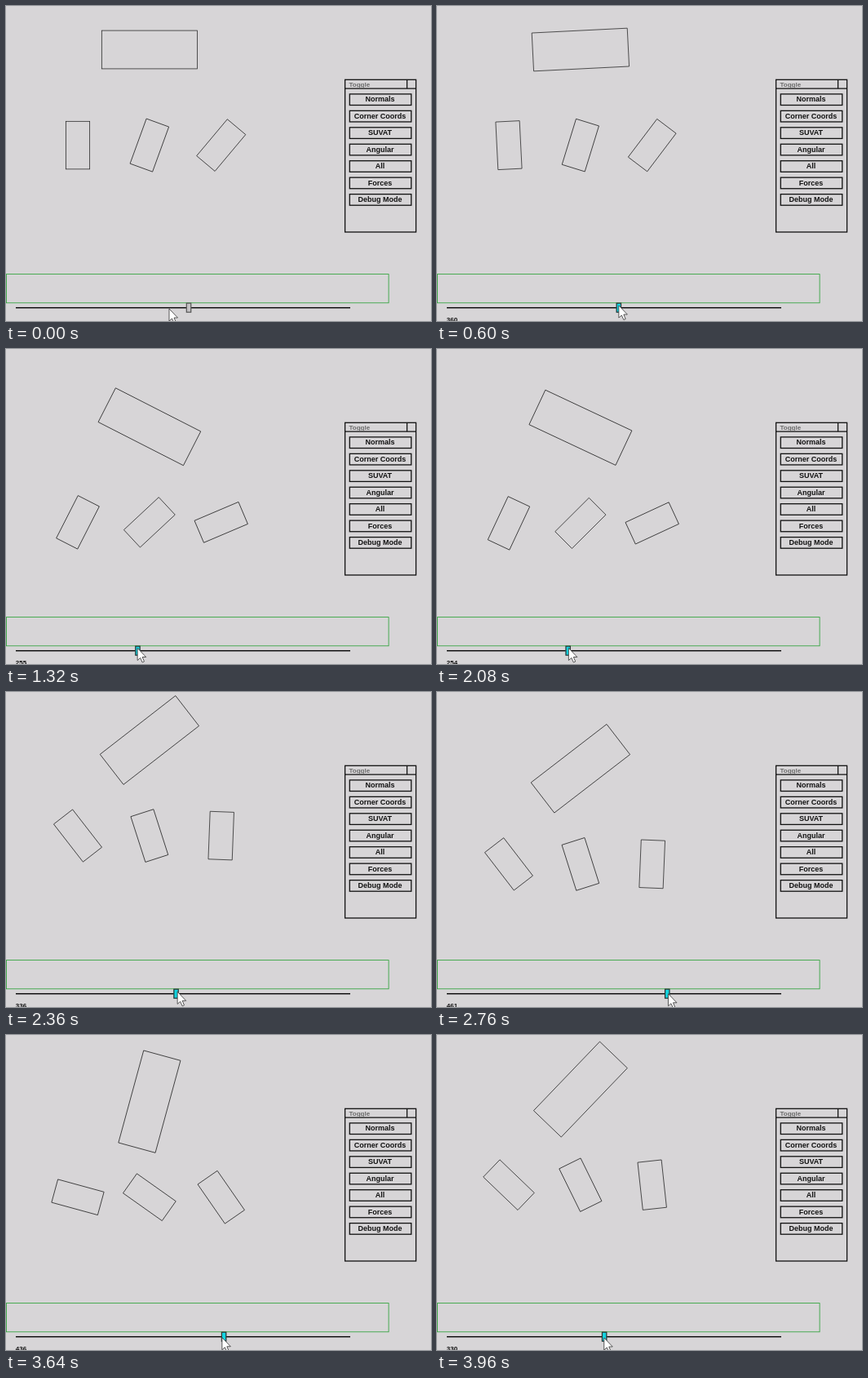
An HTML page with a canvas for the animation above (4000 ms loop, 521 by 386 pixels).

```html
<!DOCTYPE html>
<html lang="en">
<head>
<meta charset="utf-8">
<title>Physics timeline</title>
<style>
  html, body { margin: 0; width: 100%; height: 100%; overflow: hidden; background: #d7d5d7; }
  canvas { display: block; }
</style>
</head>
<body>
<canvas id="stage" width="521" height="386"></canvas>
<script>
const ctx = document.getElementById('stage').getContext('2d');
const LOOP = 4000, STEP = 40;
const SCALE = 410 / 700;       // pixels per world unit and per slider step
const START = 362;             // slider step at which the boxes are at rest
const SPIN = 0.025;            // radians per slider step
const FALL = 0.00345;          // pixels per squared slider step
const INK = '#111';

// Each drag moves the slider to an offset from START. Integration error
// leaves the boxes `drift` pixels lower; `skew` below 1 makes a brisker start.
const drags = [
  { from: 480, until: 600, to: -2, skew: 1, drift: 0, pointerY: 367 },
  { from: 675, until: 1380, to: -109, skew: 1, drift: 2.5, pointerY: 366.5 },
  { from: 2070, until: 3320, to: 178, skew: 0.71, drift: 7, pointerY: 370.5 },
  { from: 3360, until: 4000, to: -34, skew: 0.85, drift: 0, pointerY: 371 }
];

const clamp = u => Math.max(0, Math.min(1, u));
const ease = u => u * u * (3 - 2 * u);
const mix = (a, b, u) => a + (b - a) * u;
const handleX = n => 12 + (START + n) * SCALE;

function stateAt(t) {
  const approach = ease(clamp((t - 80) / 320));
  const state = { n: 0, drift: 0, pointerY: mix(371, 367, approach), approach };
  for (const drag of drags) {
    const u = clamp((t - drag.from) / (drag.until - drag.from));
    const s = ease(u ** drag.skew);
    state.n = mix(state.n, drag.to, s);
    state.drift += drag.drift * s * s;
    state.pointerY = mix(state.pointerY, drag.pointerY, ease(s));
  }
  return state;
}

function outline(x, y, w, h, color, width) {
  ctx.strokeStyle = color;
  ctx.lineWidth = width;
  ctx.strokeRect(x, y, w, h);
}

function line(x1, y1, x2, y2, width) {
  ctx.strokeStyle = INK;
  ctx.lineWidth = width;
  ctx.beginPath();
  ctx.moveTo(x1, y1);
  ctx.lineTo(x2, y2);
  ctx.stroke();
}

function label(text, x, y, size, color = INK, align = 'left') {
  ctx.font = `bold ${size}px "Liberation Sans", Arial, sans-serif`;
  ctx.fillStyle = color;
  ctx.textAlign = align;
  ctx.fillText(text, x, y);
}

function box(x, y, w, h, angle) {
  ctx.save();
  ctx.translate(x, y);
  ctx.rotate(angle);
  outline(-w / 2, -h / 2, w, h, '#222', 0.75);
  ctx.restore();
}

function drawBoxes(n, dy) {
  const turn = n * SPIN;
  box(175.9, 53.5 + dy, 200 * SCALE, 80 * SCALE, turn);
  for (let i = 0; i < 3; i++) {
    box(88 + i * 150 * SCALE, 170.6 + dy, 50 * SCALE, 100 * SCALE, turn + i * Math.PI / 9);
  }
}

function drawPanel() {
  outline(415.6, 90.3, 87, 186.7, INK, 1.3);
  line(415, 101.2, 503, 101.2, 1.3);
  line(491.6, 90, 491.6, 101, 1.3);
  label('Toggle', 420.5, 98.8, 8, '#6c6c6c');
  ['Normals', 'Corner Coords', 'SUVAT', 'Angular', 'All', 'Forces', 'Debug Mode'].forEach((name, i) => {
    const y = 107.9 + i * 20.45;
    outline(421.3, y, 75.5, 13.6, INK, 1.3);
    label(name, 458.5, y + 9.4, 9, INK, 'center');
  });
}

function drawSlider(x, active) {
  line(12, 369.7, 422, 369.7, 1.5);
  ctx.fillStyle = active ? '#12d4e0' : '#c4c2c4';
  ctx.fillRect(x - 3, 364, 6, 11.5);
  outline(x - 2.7, 364.2, 5.4, 11, active ? '#333' : '#555', 1.2);
}

function drawCursor(x, y) {
  const points = [[0, 0], [0, 15], [3.5, 12], [6, 17.5], [8.3, 16.5], [6, 11], [10.5, 11]];
  ctx.beginPath();
  points.forEach(([px, py]) => ctx.lineTo(x + px, y + py));
  ctx.closePath();
  ctx.fillStyle = '#fff';
  ctx.fill();
  ctx.strokeStyle = '#333';
  ctx.lineWidth = 0.8;
  ctx.stroke();
}

function draw(t) {
  const { n, drift, pointerY, approach } = stateAt(t);
  const x = handleX(n);
  // The pointer leads the handle slightly while dragging.
  const pointerX = mix(200, handleX(stateAt(t + 8).n), approach);
  const labelled = t >= drags[0].from && (t < 1720 || t >= 2080);

  ctx.fillStyle = '#d7d5d7';
  ctx.fillRect(0, 0, 521, 386);
  outline(0.5, 328.6, 468.6, 35.2, '#2fa33a', 0.85);
  drawBoxes(n, FALL * n * n + drift);
  drawPanel();
  drawSlider(x, Math.abs(pointerX - x) < 4);
  if (labelled) label(Math.round(START + n), 11.8, 387, 8);
  drawCursor(pointerX, pointerY);
}

const startTime = performance.now();
function tick() {
  const t = (performance.now() - startTime) % LOOP;
  draw(Math.floor(t / STEP) * STEP);
  requestAnimationFrame(tick);
}
tick();
</script>
</body>
</html>
```
